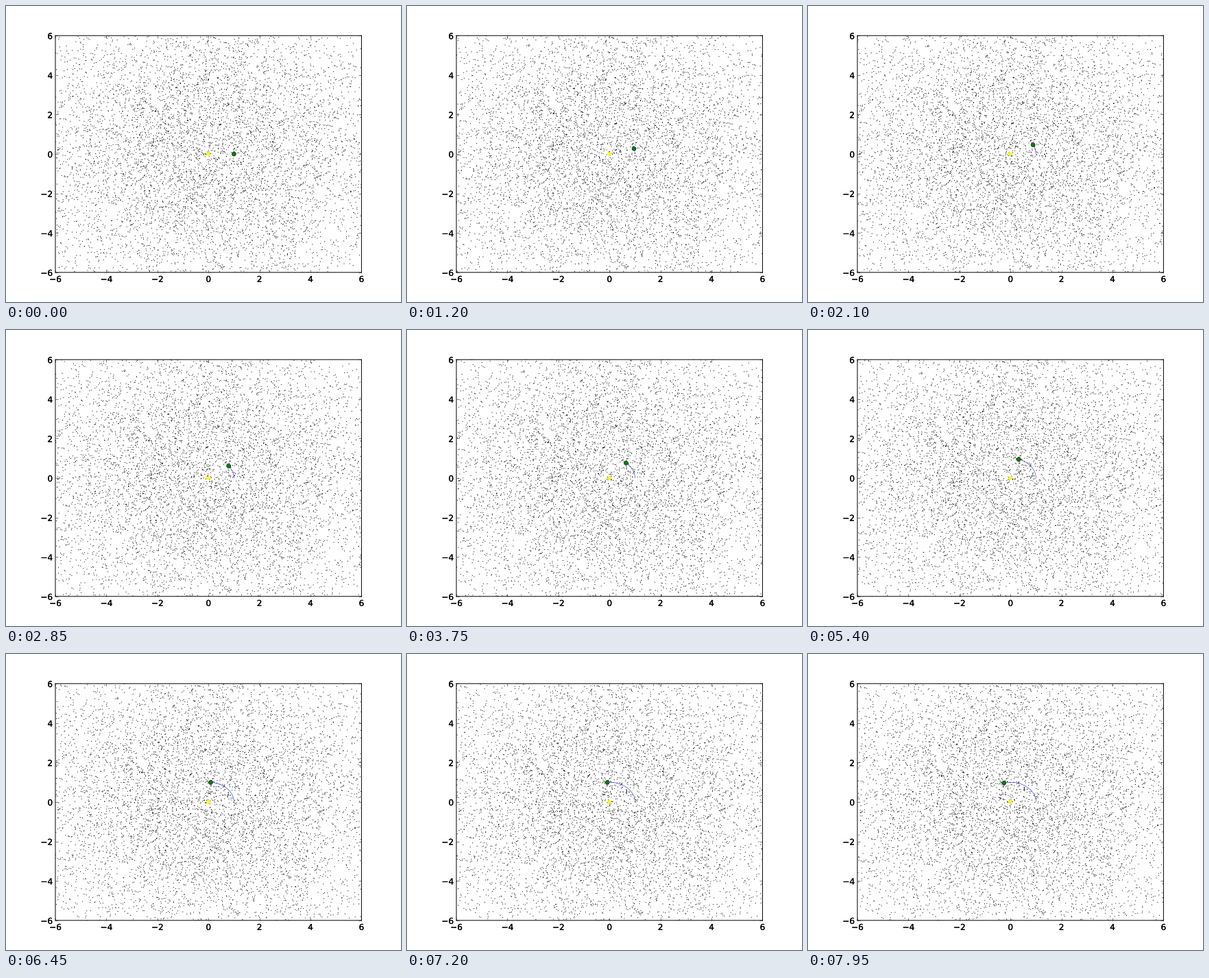
These frames come from a looping animation (576x432 px, 8 s). A matplotlib script:

```python
import numpy as np
import matplotlib.pyplot as plt
from matplotlib.animation import FuncAnimation
from matplotlib.patches import Ellipse
from matplotlib.patheffects import withStroke

INTERVAL = 50           # ms per animation frame
FRAMES = 160
HOLD = 3                # animation frames per simulation step
STEP = 4 * np.pi / 365  # planet's angle per step, two days of a year
LIMIT = 6

plt.rcParams.update({
    "font.family": "DejaVu Sans",
    "font.size": 12,
    "axes.linewidth": 1.0,
    "axes.unicode_minus": True,
})

rng = np.random.default_rng(12)
start = rng.normal(0, 4.2, (2, 9000))
radius = np.hypot(*start)
phase = np.arctan2(start[1], start[0])
rate = STEP / np.maximum(radius, 0.15) ** 1.5

fig = plt.figure(figsize=(8, 6), dpi=72, facecolor="white")
ax = fig.add_axes([0.125, 0.1, 0.775, 0.8])
ax.set(xlim=(-LIMIT, LIMIT), ylim=(-LIMIT, LIMIT))
ticks = range(-LIMIT, LIMIT + 1, 2)
ax.set_xticks(ticks)
ax.set_yticks(ticks)
ax.tick_params(direction="in", length=4, width=0.5, pad=4, top=True, right=True)

# Smooth sub-pixel rendering for the frame and the labels.
for spine in ax.spines.values():
    spine.set_snap(False)
for label in ax.get_xticklabels() + ax.get_yticklabels():
    label.set_path_effects([withStroke(linewidth=0.25, foreground="black")])


def disc(x, y, pixels, **style):
    width = 2 * LIMIT * pixels / ax.bbox.width
    height = 2 * LIMIT * pixels / ax.bbox.height
    return ax.add_patch(Ellipse((x, y), width, height, zorder=3, **style))


def polar(r, angle):
    return np.column_stack([r * np.cos(angle), r * np.sin(angle)])


dust = ax.scatter(*start, s=1, marker="s", color="black",
                  edgecolors="none", linewidths=0, snap=False)
trail, = ax.plot([], [], color="blue", lw=0.5)
disc(0, 0, 5.6, fc="yellow", ec="none")
planet = disc(1, 0, 6, fc="green", ec="black", lw=0.5)


def update(frame):
    step = frame // HOLD
    dust.set_offsets(polar(radius, phase + rate * step))
    path = polar(1.0, STEP * np.arange(step + 1))
    trail.set_data(*path.T)
    planet.set_center(path[-1])
    return dust, trail, planet


anim = FuncAnimation(fig, update, frames=FRAMES, interval=INTERVAL,
                     repeat=True, repeat_delay=0, blit=False)
plt.show()
```
